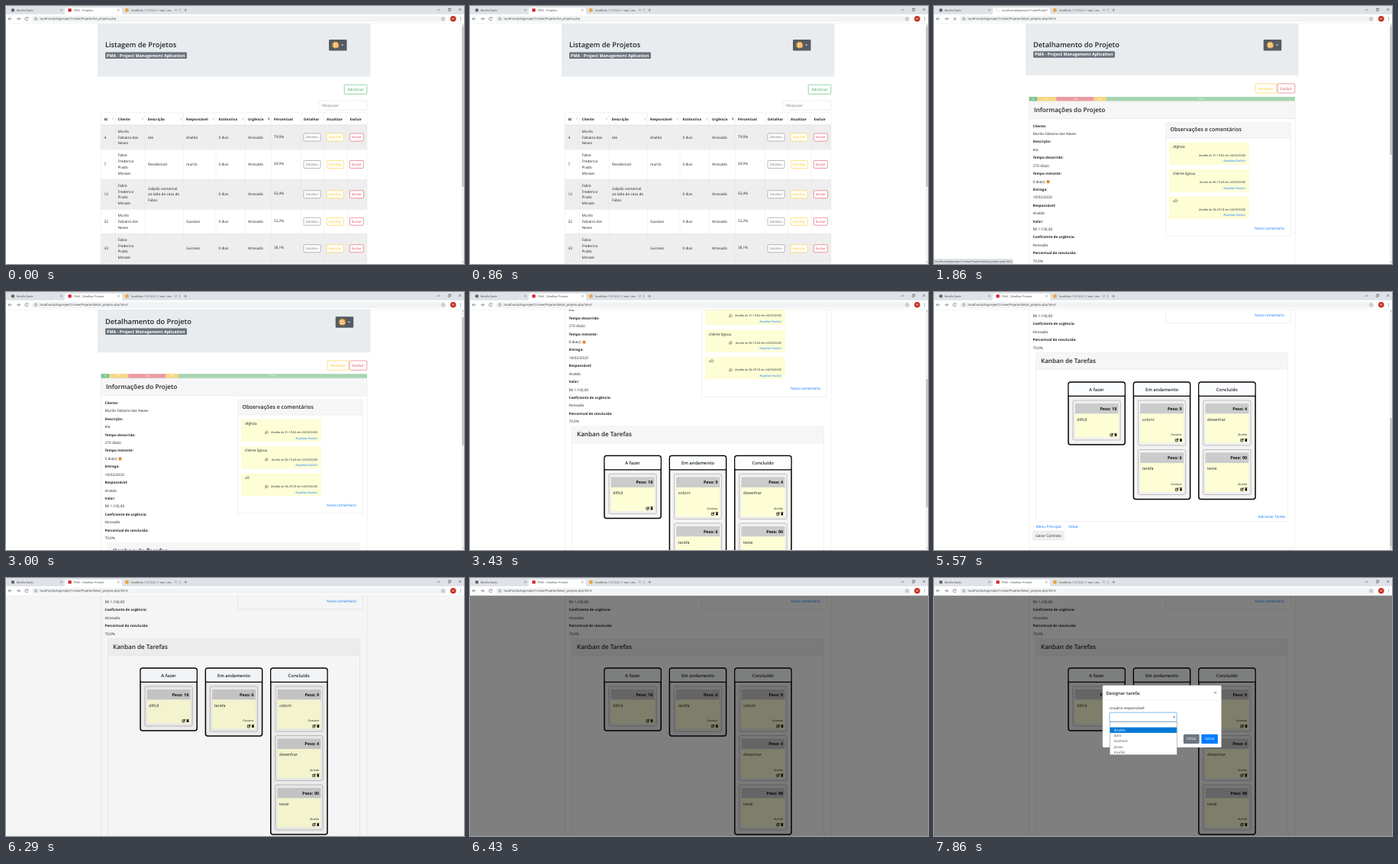
Write an HTML page that moves like this. It is 600 px wide and 338 px high and loops after 8 s.

```html
<!DOCTYPE html>
<html lang="pt-BR">
<head>
<meta charset="utf-8">
<title>PMA - Projetos</title>
<style>
  @property --scroll { syntax: '<number>'; inherits: true; initial-value: 0; }
  html, body { margin: 0; width: 100%; height: 100%; overflow: hidden; background: #fff; }
  svg { display: block; width: 100vw; height: 100vh; animation: scroll 8s linear infinite; }
  text { font-family: "Open Sans", "Noto Sans", sans-serif; text-rendering: geometricPrecision; white-space: pre; }
  .b { font-weight: 700; }
  .s { font-weight: 600; }
  .e { text-anchor: end; }
  .m { text-anchor: middle; }

  .page { transform: translateY(calc(var(--scroll) * -1px)); }
  .thumb { transform: translateY(calc(var(--scroll) * .53px)); }
  @keyframes scroll {
    0%, 35.75% { --scroll: 0; }
    37.5% { --scroll: 11.5; }
    39.25% { --scroll: 45; }
    41.1% { --scroll: 100; }
    42.9% { --scroll: 165; }
    44.6% { --scroll: 225; }
    46.4% { --scroll: 259.3; }
    48.25%, 100% { --scroll: 261; }
  }

  /* hard switches */
  .list, .detail, .hover, .loading, .idle, .loaded, .before, .after, .bar, .open, .blank, .pick {
    animation: 8s step-end infinite;
  }
  .list { animation-name: list; }
  .detail { animation-name: detail; }
  .hover { animation-name: hover; }
  .loading { animation-name: loading; }
  .idle { animation-name: idle; }
  .loaded { animation-name: loaded; }
  .before { animation-name: before; }
  .after { animation-name: after; }
  .bar { animation-name: bar; }
  .open { animation-name: open; }
  .blank { animation-name: blank; }
  .pick { animation-name: pick; }
  @keyframes list { 0% { opacity: 1; } 19.6%, 100% { opacity: 0; } }
  @keyframes detail { 0% { opacity: 0; } 19.6%, 100% { opacity: 1; } }
  @keyframes hover { 0% { opacity: 0; } 16.1% { opacity: 1; } 28.6%, 100% { opacity: 0; } }
  @keyframes loading { 0% { opacity: 0; } 17.9% { opacity: 1; } 28.6%, 100% { opacity: 0; } }
  @keyframes idle { 0% { opacity: 1; } 17.9% { opacity: 0; } 28.6%, 100% { opacity: 1; } }
  @keyframes loaded { 0% { opacity: 0; } 28.6%, 100% { opacity: 1; } }
  @keyframes before { 0% { opacity: 1; } 75.75%, 100% { opacity: 0; } }
  @keyframes after { 0% { opacity: 0; } 75.75%, 100% { opacity: 1; } }
  @keyframes bar { 0% { opacity: 1; } 78.5%, 100% { opacity: 0; } }
  @keyframes open { 0% { opacity: 0; } 89.25%, 100% { opacity: 1; } }
  @keyframes blank { 0% { opacity: 1; } 92.9%, 100% { opacity: 0; } }
  @keyframes pick { 0% { opacity: 0; } 92.9%, 100% { opacity: 1; } }

  .drag { animation: drag 8s ease-in-out infinite; }
  .shade { animation: shade 8s linear infinite; }
  .modal { animation: modal 8s ease-out infinite; }
  @keyframes drag {
    0%, 72.5% { transform: none; }
    75.75% { transform: translate(58px, -3px); }
    77.5%, 100% { transform: translate(85.5px, 0); }
  }
  @keyframes shade { 0%, 78.5% { opacity: 0; } 80.25%, 100% { opacity: .5; } }
  @keyframes modal {
    0%, 80.5% { opacity: 0; transform: translateY(-15.6px); }
    84.25%, 100% { opacity: 1; transform: none; }
  }
</style>
</head>
<body>
<svg id="stage" viewBox="0 0 600 338" preserveAspectRatio="none"></svg>
<script>
const INK = '#212529', GREY = '#6c757d', LINE = '#dee2e6', BLUE = '#007bff',
      GREEN = '#28a745', AMBER = '#ffc107', RED = '#dc3545', NOTE = '#fdfdd6';
const OWNER = '4naldo', CLIENT = 'Murilo Fabiano das Neves';

const g = (cls, ...parts) => `<g class="${cls}">${parts.flat(9).join('')}</g>`;
const at = (x, y, ...parts) => `<g transform="translate(${x} ${y})">${parts.flat(9).join('')}</g>`;
const rect = (x, y, w, h, fill, r = 0) =>
  `<rect x="${x}" y="${y}" width="${w}" height="${h}" rx="${r}" fill="${fill}"/>`;
const box = (x, y, w, h, stroke, fill = 'none', r = 0, sw = .4) =>
  `<rect x="${x}" y="${y}" width="${w}" height="${h}" rx="${r}" fill="${fill}" stroke="${stroke}" stroke-width="${sw}"/>`;
const dot = (x, y, r, fill) => `<circle cx="${x}" cy="${y}" r="${r}" fill="${fill}"/>`;
const path = (d, stroke, sw = .6, fill = 'none') =>
  `<path d="${d}" stroke="${stroke}" stroke-width="${sw}" fill="${fill}"/>`;
// y is the vertical middle of the line
const text = (x, y, size, str, cls = '', fill = INK) =>
  `<text x="${x}" y="${y + size * .35}" font-size="${size}" class="${cls}" fill="${fill}">${str}</text>`;
const button = (x, y, w, h, label, color, size = 4.75) =>
  box(x, y, w, h, color, '#fff', 1.2, .5) + text(x + w / 2, y + h / 2, size, label, 'm', color);
const solid = (x, y, w, h, label, color) =>
  rect(x, y, w, h, color, 1.2) + text(x + w / 2, y + h / 2, 4.75, label, 'm', '#fff');

function banner(title, bottom, badgeY, userX) {
  return [
    rect(120, 23, 357.5, bottom - 23, '#e9ecef'),
    text(130, 50.5, 9.25, title, 's'),
    rect(130, badgeY, 107, 8.6, GREY, 1.2),
    text(132, badgeY + 4.2, 5.45, 'PMA - Project Management Aplication', 'b', '#fff'),
    rect(userX, 44, 23.5, 14.5, '#545b62', 1.2),
    dot(userX + 8.8, 51.2, 4.4, '#eba43c'),
    dot(userX + 7.6, 49.9, 1.1, '#fff'), dot(userX + 10.4, 50.2, .9, '#fff'),
    path(`M${userX + 5.8} 53.4q1.8 -3.4 3.6 0zm4 0q1.2 -3 2.6 0z`, 'none', 0, '#fff'),
    path(`M${userX + 16.2} 50.4h3l-1.5 1.6z`, 'none', 0, '#fff'),
  ];
}

function listPage() {
  const cols = [124, 143, 182, 232.5, 275, 313.5, 347.5, 386.5, 416.5, 447, 473];
  const heads = ['Id', 'Cliente', 'Descrição', 'Responsável', 'Estimativa', 'Urgência',
                 'Percentual', 'Detalhar', 'Atualizar', 'Excluir'];
  const a = ['Murilo', 'Fabiano das', 'Neves'], b = ['Fabio', 'Frederico', 'Prado', 'Moraes'];
  const rows = [
    [156, 188, 4, a, ['eta'], OWNER, '79,9%'],
    [188, 227, 7, b, ['Residencial'], 'murilo', '60,0%'],
    [227, 266.5, 12, b, ['Galpão comercial', 'ao lado da casa do', 'Fabio'], '', '65,4%'],
    [266.5, 298, 32, a, [], 'Gustavo', '22,2%'],
    [298, 337.5, 33, b, [], 'Gustavo', '38,1%'],
  ];
  const lines = (x, mid, list) =>
    list.map((s, i) => text(x, mid + (i - (list.length - 1) / 2) * 7.8, 4.75, s));
  const body = rows.map(([top, end, id, client, desc, who, pct], i) => {
    const mid = (top + end) / 2;
    return [
      rect(124, top, 349, end - top, i % 2 ? '#fff' : '#eeeeee'),
      path(`M124 ${top}h349`, LINE, .4),
      text(128.5, mid, 4.75, id), lines(146.5, mid, client), lines(186, mid, desc),
      text(236, mid, 4.75, who), text(278.5, mid, 4.75, '0 dias'),
      text(317, mid, 4.75, 'Atrasado'), text(351, mid - 1, 4.75, pct),
      button(390, mid - 5, 22, 10, 'Detalhar', GREY, 4.15),
      button(420.2, mid - 5, 22, 10, 'Atualizar', AMBER, 4.15),
      button(450.4, mid - 5, 18, 10, 'Excluir', RED, 4.15),
    ];
  });
  const sorts = cols.slice(1, 7).map((x, i) => {
    const c = i === 5 ? '#333' : '#c4c4c4';
    return path(`M${x - 4.2} 147.4h2l-1 -1.5zm0 .9h2l-1 1.5z`, 'none', 0, c);
  });
  return g('list',
    banner('Listagem de Projetos', 92.5, 60.5, 423),
    button(443.2, 103.2, 29.6, 12.2, 'Adicionar', GREEN),
    box(410, 124, 63, 12.2, '#ced4da', '#fff', 1.2),
    text(414, 130.2, 4.75, 'Pesquisar', '', GREY),
    body,
    path('M124 139.7h349', LINE, .4), path('M124 156h349', LINE, .8),
    cols.map(x => path(`M${x} 139.7V338`, LINE, .4)),
    heads.map((h, i) => text(cols[i] + (i ? 3.6 : 4.5), 148, 4.6, h, 'b')),
    sorts.slice(0, 5), sorts[5].replace('341', '341'),
    g('hover', solid(390, 167, 22, 10, '', GREY), text(401, 172, 4.15, 'Detalhar', 'm', '#fff')),
    scrollbar(rect(597.4, 27, 2.4, 210, '#c1c1c1')));
}

function scrollbar(thumb) {
  return g('bar', rect(597, 23, 3, 315, '#f1f1f1'),
    path('M597.8 25.6h1.6l-.8 -1zm0 9.6', 'none', 0, '#606060'),
    path('M597.8 335.2h1.6l-.8 1z', 'none', 0, '#606060'), thumb);
}

function progress() {
  const parts = [[4, '#7cc08f'], [9, '#f5d683'], [18, '#ea9aa1'], [6, '#f5d683'], [90, '#a6d5b1']];
  let x = 124.5;
  return parts.map(([weight, color]) => {
    const w = weight / 127 * 348.5, left = x;
    x += w;
    return rect(left, 119, w, 5.5, color) +
      text(left + w / 2, 121.8, 3.5, Math.round(weight / 1.27) + '%', 'm', '#fff');
  });
}

function comment(i, body, meta, iconX) {
  const y = 178.5 + i * 35.5;
  return [
    rect(308, y, 105, 29.4, NOTE, 1),
    text(313, y + 5.4, 4.75, body),
    text(408, y + 17, 3.8, meta, 'e'),
    g('loaded', at(iconX, y + 17,
      `<ellipse rx="1.7" ry="1.4" fill="none" stroke="${INK}" stroke-width=".5"/>`,
      path('M-1.3 .7l-.6 1.2l1.6 -.6', INK, .4))),
    text(408, y + 24.6, 3.9, 'Atualizar Excluir', 'e', BLUE),
  ];
}

function task(x, y, weight, name, owner) {
  const h = owner ? 59 : 52, icons = y + h - 7;
  return [
    box(x, y, 62.2, h, '#a8a8a8', '#f0f0f0', 2, .7),
    rect(x + 2.8, y + 4, 56.8, 13.5, '#cbcbcb'),
    rect(x + 2.8, y + 17.5, 56.8, h - 21, NOTE),
    text(x + 57.3, y + 10.8, 5.45, 'Peso: ' + weight, 'be b e', '#111'),
    text(x + 5.3, y + 25, 5.4, name),
    owner ? text(x + 57.2, y + 45, 3.75, owner, 'e') : '',
    at(x + 50.8, icons,
      box(-1.9, -1.3, 3.2, 3.2, '#000', 'none', .4, .7),
      path('M-.6 .6L2 -2', '#000', 1)),
    at(x + 56, icons,
      rect(-1.3, -1.3, 2.6, 3.4, '#000', .3), rect(-1.7, -2.1, 3.4, .6, '#000')),
  ];
}

const TASKS = {
  hard: [18, 'difícil', ''], color: [9, 'colorir', 'Gustavo'], job: [6, 'tarefa', 'Gustavo'],
  draw: [4, 'desenhar', OWNER], test: [90, 'teste', OWNER],
};

// null keeps the slot of the task being dragged
function board(cls, extra, columns) {
  const names = ['A fazer', 'Em andamento', 'Concluído'];
  const cols = columns.map((keys, i) => {
    const x = 176 + i * 85.4;
    const end = 142 + keys.length * 64.5 - (keys[0] === 'hard' ? 12.5 : 5.5) + 6;
    return [
      box(x, 118, 74.2, end - 118, '#000', '#f3f3f3', 3, 1.5),
      rect(x + .7, 119, 72.8, 17, '#fcfdfe', 2),
      path(`M${x} 136.4h74.2`, '#000', 1.4),
      text(x + 37.1, 127.6, 5.85, names[i], 's m'),
      keys.map((k, n) => k ? task(x + 6, 142 + n * 64.5, ...TASKS[k]) : ''),
    ];
  });
  return g(cls,
    path(`M124.5 -136V${335.5 + extra}H473V-136`, '#d9d9d9', .4),
    box(133.5, 79.5, 330, 221 + extra, '#d9d9d9', '#fff', 1),
    rect(133.7, 79.7, 329.6, 21.5, '#f6f6f6'),
    path('M133.5 101.3h330', '#d9d9d9', .4),
    text(140, 90, 8.1, 'Kanban de Tarefas', 's'),
    cols,
    at(0, extra,
      text(460, 294, 4.75, 'Adicionar Tarefa', 'e', BLUE),
      text(133.5, 307, 4.75, 'Menu Principal', '', BLUE),
      text(176, 307, 4.75, 'Voltar', '', BLUE),
      box(129.5, 313, 41, 12.2, '#dcdcdc', '#efefef', .8, .3),
      text(150, 319.2, 4.75, 'Gerar Contrato', 'm')));
}

function detailPage() {
  const facts = ['Cliente:', CLIENT, 'Descrição:', 'eta', 'Tempo decorrido:', '270 dia(s)',
    'Tempo restante:', '0 dia(s)', 'Entrega:', '18/02/2020', 'Responsável:', OWNER,
    'Valor:', 'R$ 1.100,00', 'Coeficiente de urgência:', 'Atrasado',
    'Percentual de conclusão:', '79,9%'];
  return g('detail',
    g('page',
      banner('Detalhamento do Projeto', 91, 59.2, 431.7),
      button(421, 101.8, 27.8, 12.2, 'Atualizar', AMBER),
      button(450, 101.8, 22.8, 12.2, 'Excluir', RED),
      progress(),
      rect(124.5, 125, 348.5, 22.5, '#f6f6f6'),
      path('M124.5 125h348.5M124.5 147.5h348.5', '#d9d9d9', .4),
      text(131, 136.3, 8.25, 'Informações do Projeto', 's'),
      facts.map((s, i) => text(129.5, 157 + i * 10.42, i % 2 ? 4.75 : 4.6, s, i % 2 ? '' : 'b')),
      dot(149.4, 230.2, 2.2, '#ee9a2e'), rect(149.1, 229, .6, 2.3, '#7a4a10'),
      box(303.5, 152.5, 164, 149.3, '#d9d9d9', '#fff', 1),
      rect(303.7, 152.7, 163.6, 20, '#f6f6f6'),
      path('M303.5 172.8h164', '#d9d9d9', .4),
      text(309.5, 162, 7, 'Observações e comentários', 's'),
      comment(0, 'dfghda', OWNER + ' às 21:19:02 em 20/02/2020', 341.5),
      comment(1, 'cliente ligouu', 'murilo às 06:15:43 em 22/03/2020', 341.5),
      comment(2, 'xD', OWNER + ' às 04:29:18 em 24/03/2020', 341.5),
      text(459, 291, 4.8, 'Novo comentário', 'e', BLUE),
      at(0, 261,
        board('before', 0, [['hard'], [null, 'job'], ['draw', 'test']]),
        board('after', 64.5, [['hard'], ['job'], [null, 'draw', 'test']]),
        g('drag', task(267.4, 142, ...TASKS.color)))),
    scrollbar(g('thumb', rect(597.4, 27, 2.4, 168, '#c1c1c1'))));
}

function dialog() {
  const users = [OWNER, 'dani', 'Gustavo', 'jonas', 'murilo'];
  return g('modal',
    box(220.8, 140.5, 155.8, 81.6, '#777', '#fff', 1.6, .3),
    text(225.5, 150.5, 5.85, 'Designar tarefa:', 's'),
    path('M367.1 148.7l3 3m0 -3l-3 3', '#666', .7),
    path('M221 160.3h155.4M221 199.6h155.4', LINE, .4),
    text(230, 170, 4.75, 'Usuário responsável:'),
    box(230, 176.2, 88, 12, '#ced4da', '#fff', 1.2),
    path('M313.4 181.6h2.6l-1.3 1.6z', 'none', 0, '#343a40'),
    solid(326.8, 204.7, 20.8, 12.2, 'Voltar', GREY),
    solid(350.3, 204.7, 21.6, 12.2, 'Salvar', BLUE),
    g('open',
      box(230, 176.2, 88, 12, '#6fb3fb', 'none', 1.2, .8),
      box(230.2, 188.7, 88, 43, '#7a7a7a', '#fff', 0, .5),
      users.map((u, i) => text(235.6, 199.3 + i * 7.2, 4.75, u, '', '#495057')),
      g('blank', rect(230.5, 189, 87.4, 6.6, '#0078d7')),
      g('pick', rect(230.5, 195.6, 87.4, 7.3, '#0078d7'), text(235.6, 199.3, 4.75, OWNER, '', '#fff'))));
}

function browser() {
  const cross = (x, y, r, c = '#5f6368', w = .5) =>
    path(`M${x - r} ${y - r}l${2 * r} ${2 * r}m0 ${-2 * r}l${-2 * r} ${2 * r}`, c, w);
  const root = 'localhost/phpproject1/view/Projeto/', detail = root + 'detail_projeto.php?id=4';
  const tab = (s, cls = '') => text(89, 5.4, 3.7, s, cls, '#3c4043');
  return [
    rect(0, 0, 600, 11, '#dee1e6'), rect(0, 10.8, 600, 12.2, '#fff'),
    path('M75 11q2 0 2 -2V4q0 -2 2 -2H150q2 0 2 2V9q0 2 2 2z', 'none', 0, '#fff'),
    dot(9, 5.4, 2.2, '#5f6368'), text(14, 5.4, 3.7, 'Murilo Dario', '', '#3c4043'),
    cross(72.5, 5.4, 1.3), cross(147.3, 5.4, 1.3), cross(222.6, 5.4, 1.3),
    rect(156.3, 3.3, 4.2, 4.2, '#f0a030'),
    text(164, 5.4, 3.7, 'localhost / 127.0.0.1 / arq / usu', '', '#3c4043'),
    path('M227.8 3.5v4M233 5.4h4.4M235.2 3.2v4.4', '#5f6368', .5),
    g('idle', rect(81.5, 3.3, 4.2, 4.2, '#d8232a'),
      g('list', tab('PMA - Projetos')), g('detail', tab('PMA - Detalhar Projeto')),
      path('M28.8 15.6a2.1 2.1 0 1 0 .2 2', '#5f6368', .7),
      path('M29.4 14.4v1.9h-1.9z', 'none', 0, '#5f6368')),
    g('loading', tab('localhost/phpproject1/view/Proje'),
      path('M83.6 3.4a2 2 0 1 0 2 2', '#c6cbd2', .5), cross(27.2, 16.8, 1.8, '#5f6368', .7)),
    path('M565 5h3.6', '#333', .5), cross(594.7, 4.6, 1.5, '#333'),
    box(579.4, 3.8, 2.5, 2.5, '#333'), path('M580.3 3.8v-.8h2.5v2.5h-.9', '#333', .4),
    path('M7.6 16.8H3.2m2 -2l-2 2l2 2', '#5f6368', .7),
    path('M14 16.8h4.4m-2 -2l2 2l-2 2', '#5f6368', .7),
    rect(33.5, 12.9, 544, 8, '#f1f3f4', 4),
    `<circle cx="39" cy="16.8" r="1.8" fill="none" stroke="#5f6368" stroke-width=".5"/>`,
    path('M39 16.5v1.3M39 15.6v.5', '#5f6368', .5),
    g('list', text(44.5, 16.8, 4.15, root + 'list_projeto.php', '', '#3c4043')),
    g('detail', text(44.5, 16.8, 4.15, detail, '', '#3c4043')),
    path('M572.6 14.5l.7 1.6l1.7 .1l-1.3 1.1l.4 1.7l-1.5 -.9l-1.5 .9l.4 -1.7l-1.3 -1.1l1.7 -.1z', '#5f6368', .4),
    dot(585.8, 16.8, 3.8, '#c5301f'), text(585.8, 16.8, 3.8, 'M', 'm', '#fff'),
    [14.9, 16.8, 18.7].map(y => dot(595.6, y, .5, '#5f6368')),
    path('M0 23h600', '#dcdee1', .4),
    g('hover', path('M0 331.6h102q1.4 0 1.4 1.4v5H0z', '#c4c7cc', .3, '#dee1e6'),
      text(1.2, 335, 3.65, detail, '', '#3c4043')),
  ];
}

document.getElementById('stage').innerHTML = [
  rect(0, 0, 600, 338, '#fff'),
  listPage(), detailPage(),
  `<rect class="shade" y="23" width="600" height="315"/>`,
  dialog(), browser(),
].flat(9).join('');
</script>
</body>
</html>
```
